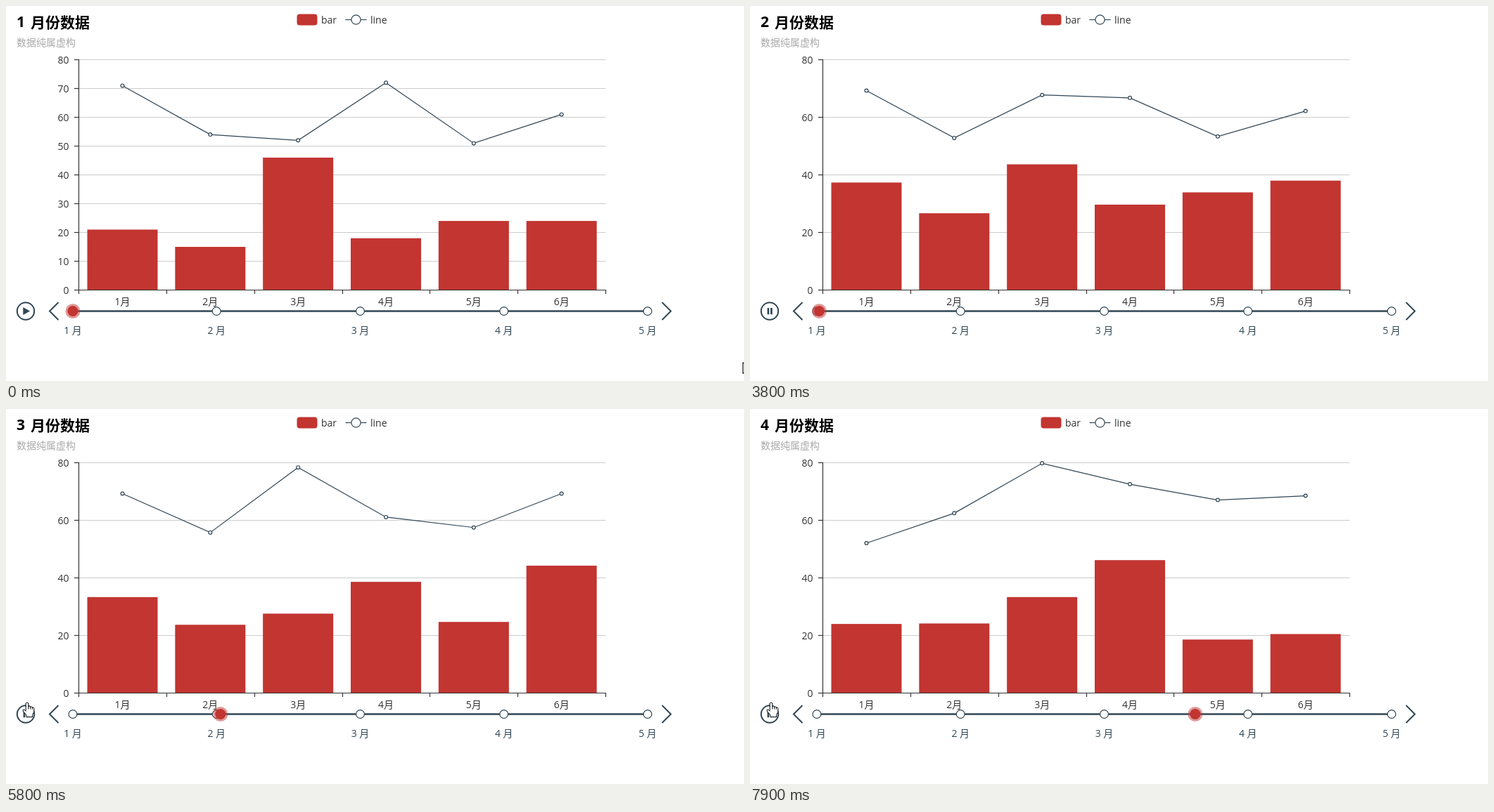
Recreate the animation shown at these times as an HTML page with a canvas. Size 1049 px wide and 534 px high, loop 8 s.

```html
<!DOCTYPE html>
<html lang="zh">
<head>
<meta charset="utf-8">
<style>
html, body { margin: 0; width: 100%; height: 100%; overflow: hidden; background: #fff; }
canvas { display: block; }
</style>
</head>
<body>
<canvas id="stage" width="1049" height="534"></canvas>
<script>
const ctx = document.getElementById('stage').getContext('2d');
const LOOP = 8000, STEP = 100, TWEEN = 300;
const RED = '#c23531', NAVY = '#2f4554', SLATE = '#304654', INK = '#333';
const FAMILY = '"Open Sans", "Noto Sans CJK SC", "Noto Sans CJK", sans-serif';
const LEFT = 103.5, RIGHT = 852.5, BASE = 404.5, UNIT = 4.1;
const BAND = (RIGHT - LEFT) / 6, TRACK_Y = 434.5;

const months = [
  { start: 0,    bar: [21, 15, 46, 18, 24, 24], line: [71, 54, 52, 72, 51, 61] },
  { start: 3724, bar: [49, 35, 42, 38, 41, 48], line: [68, 52, 79, 63, 55, 63] },
  { start: 5716, bar: [24, 17, 19, 39, 15, 42], line: [70, 58, 78, 60, 59, 73] },
  { start: 7741, bar: [24, 25, 35, 47, 19, 18], line: [50, 63, 80, 74, 68, 68] }
];

// Cursor poses: time, shape, tip x, tip y
const poses = [
  [0, 'arrow', 1047.5, 507.5], [200, 'arrow', 1046.5, 507.5], [300],
  [900, 'arrow', 94.5, 520.5], [1000, 'arrow', 80.5, 497.5], [1100, 'arrow', 65.5, 472.5],
  [1200, 'arrow', 51.5, 448.5], [1300, 'hand', 41, 427], [1400, 'hand', 36, 412],
  [1500, 'hand', 34, 406.5], [1700, 'hand', 33, 408.5], [1800, 'hand', 31, 414],
  [1900, 'hand', 20, 430], [2000, 'arrow', 4.5, 446.5], [2100],
  [4600, 'arrow', 54.5, 483.5], [4700, 'arrow', 42.5, 452.5], [4800, 'arrow', 30.5, 423.5],
  [5200, 'hand', 30, 420], [5300, 'hand', 30, 418.5], [5400, 'hand', 30, 417.5]
];

const lastStarted = (list, t, startOf) => list.reduce((found, item, i) => startOf(item) <= t ? i : found, 0);
const cubicOut = k => 1 - (1 - k) ** 3;
const quinticInOut = k => k < 0.5 ? 16 * k ** 5 : 1 - (2 - 2 * k) ** 5 / 2;
const mix = (a, b, k) => a + (b - a) * k;
const valueY = v => BASE - v * UNIT;
const bandX = i => LEFT - 0.4 + BAND * (i + 0.5);
const stopX = i => 95 + 204.25 * i;

function text(str, x, y, color = INK, align = 'left', font = '14px') {
  ctx.font = `${font} ${FAMILY}`;
  ctx.fillStyle = color;
  ctx.textAlign = align;
  ctx.fillText(str, x, y);
}

function stroke(points, color, width) {
  ctx.beginPath();
  points.forEach(([x, y]) => ctx.lineTo(x, y));
  ctx.strokeStyle = color;
  ctx.lineWidth = width;
  ctx.stroke();
}

function disc(x, y, r, fill, border, width) {
  ctx.beginPath();
  ctx.arc(x, y, r, 0, Math.PI * 2);
  ctx.fillStyle = fill;
  ctx.fill();
  ctx.strokeStyle = border;
  ctx.lineWidth = width;
  ctx.stroke();
}

function drawHeader(month) {
  text(month + 1, 15, 30, '#000', 'left', 'bold 21px');
  text('月份数据', 35, 30.5, '#000', 'left', 'bold 21px');
  text('数据纯属虚构', 15, 57, '#aaa');
  ctx.fillStyle = RED;
  ctx.beginPath();
  ctx.roundRect(413.5, 11.5, 29, 16, 4);
  ctx.fill();
  text('bar', 448, 25);
  stroke([[482.5, 19.5], [512.5, 19.5]], NAVY, 1.2);
  disc(497.5, 19.5, 6.6, '#fff', NAVY, 1.2);
  text('line', 518, 25);
}

function drawAxes(month) {
  const gap = month ? 20 : 10;
  for (let v = 0; v <= 80; v += gap) {
    const y = valueY(v);
    if (v) stroke([[LEFT, y], [RIGHT, y]], '#ccc', 1.2);
    stroke([[97, y], [LEFT, y]], INK, 1.2);
    text(v, 89.5, y + 5, INK, 'right');
  }
  stroke([[LEFT, 76], [LEFT, 405]], INK, 1.2);
  for (let i = 0; i <= 6; i++) {
    const x = Math.floor(LEFT + BAND * i) + 0.5;
    stroke([[x, BASE], [x, 410]], INK, 1.2);
    if (i < 6) text(i + 1 + '月', bandX(i), 426, INK, 'center');
  }
}

function drawSeries(bars, values) {
  ctx.fillStyle = RED;
  bars.forEach((v, i) => ctx.fillRect(bandX(i) - 50, valueY(v), 100, v * UNIT));
  stroke([[LEFT, BASE], [RIGHT + 0.5, BASE]], INK, 1.2);
  const points = values.map((v, i) => [bandX(i), valueY(v)]);
  stroke(points, NAVY, 1.2);
  points.forEach(([x, y]) => disc(x, y, 2.4, '#fff', NAVY, 1.2));
}

function drawButton(playing, color) {
  disc(28, TRACK_Y, 12.2, 'transparent', color, 2);
  ctx.fillStyle = color;
  if (playing) {
    ctx.fillRect(24.6, 430, 2.7, 9.2);
    ctx.fillRect(29.1, 430, 2.7, 9.2);
    return;
  }
  ctx.beginPath();
  ctx.moveTo(25.3, 430.7);
  ctx.lineTo(32, 434.5);
  ctx.lineTo(25.3, 438.3);
  ctx.closePath();
  ctx.lineWidth = 2;
  ctx.fill();
  ctx.stroke();
}

function drawTimeline(markerX) {
  stroke([[95, TRACK_Y], [912, TRACK_Y]], SLATE, 2.3);
  stroke([[74.5, 422], [62, 434.5], [74.5, 447]], SLATE, 2);
  stroke([[932.5, 422], [945, 434.5], [932.5, 447]], SLATE, 2);
  for (let i = 0; i < 5; i++) {
    disc(stopX(i), TRACK_Y, 5.9, '#fff', SLATE, 1.2);
    text(i + 1 + ' 月', stopX(i), 467, SLATE, 'center');
  }
  disc(markerX, TRACK_Y, 7.6, RED, 'rgba(194,53,49,0.5)', 5.8);
}

const cursors = {
  arrow: new Path2D('M0 0V16L3.7 12.5L6.2 18L8.5 17L6.1 11.6L11 11.3Z'),
  hand: new Path2D('M-1.8 12V1.5Q0 -1 1.8 1.5V6Q3.8 4.8 4.8 6.6Q6.6 5.6 7.4 7.4Q9.6 6.8 9.8 9V14' +
    'L7.5 18V21H-1V18.5L-6 12.5Q-6.2 10 -4 10.5L-1.8 13')
};

function drawCursor([, shape, x, y]) {
  if (!shape) return;
  ctx.save();
  ctx.translate(x, y);
  ctx.fillStyle = '#fff';
  ctx.strokeStyle = '#000';
  ctx.lineWidth = 1;
  ctx.fill(cursors[shape]);
  ctx.stroke(cursors[shape]);
  if (shape === 'hand') {
    for (const [kx, ky] of [[1.8, 6], [4.8, 6.6], [7.4, 7.4]]) stroke([[kx, ky], [kx, 10]], '#000', 1);
  }
  ctx.restore();
}

function draw(t) {
  const month = lastStarted(months, t, m => m.start);
  const now = months[month], before = months[Math.max(0, month - 1)];
  const k = Math.min(1, (t - now.start) / TWEEN);
  const blend = key => now[key].map((v, i) => mix(before[key][i], v, cubicOut(k)));
  const pose = poses[lastStarted(poses, t, p => p[0])];
  // A redraw of the chart clears the hover colour, so it lasts only until then.
  const hovered = (t >= 1300 && t < 1800) || (t >= 5200 && t < 5800);

  ctx.fillStyle = '#fff';
  ctx.fillRect(0, 0, 1049, 534);
  drawHeader(month);
  drawAxes(month);
  drawSeries(blend('bar'), blend('line'));
  drawTimeline(mix(stopX(Math.max(0, month - 1)), stopX(month), quinticInOut(k)));
  drawButton(t >= 1800, hovered ? RED : SLATE);
  drawCursor(pose);
}

const origin = performance.now();
function tick() {
  const t = (performance.now() - origin) % LOOP;
  draw(Math.floor(t / STEP) * STEP);
  requestAnimationFrame(tick);
}
tick();
</script>
</body>
</html>
```
